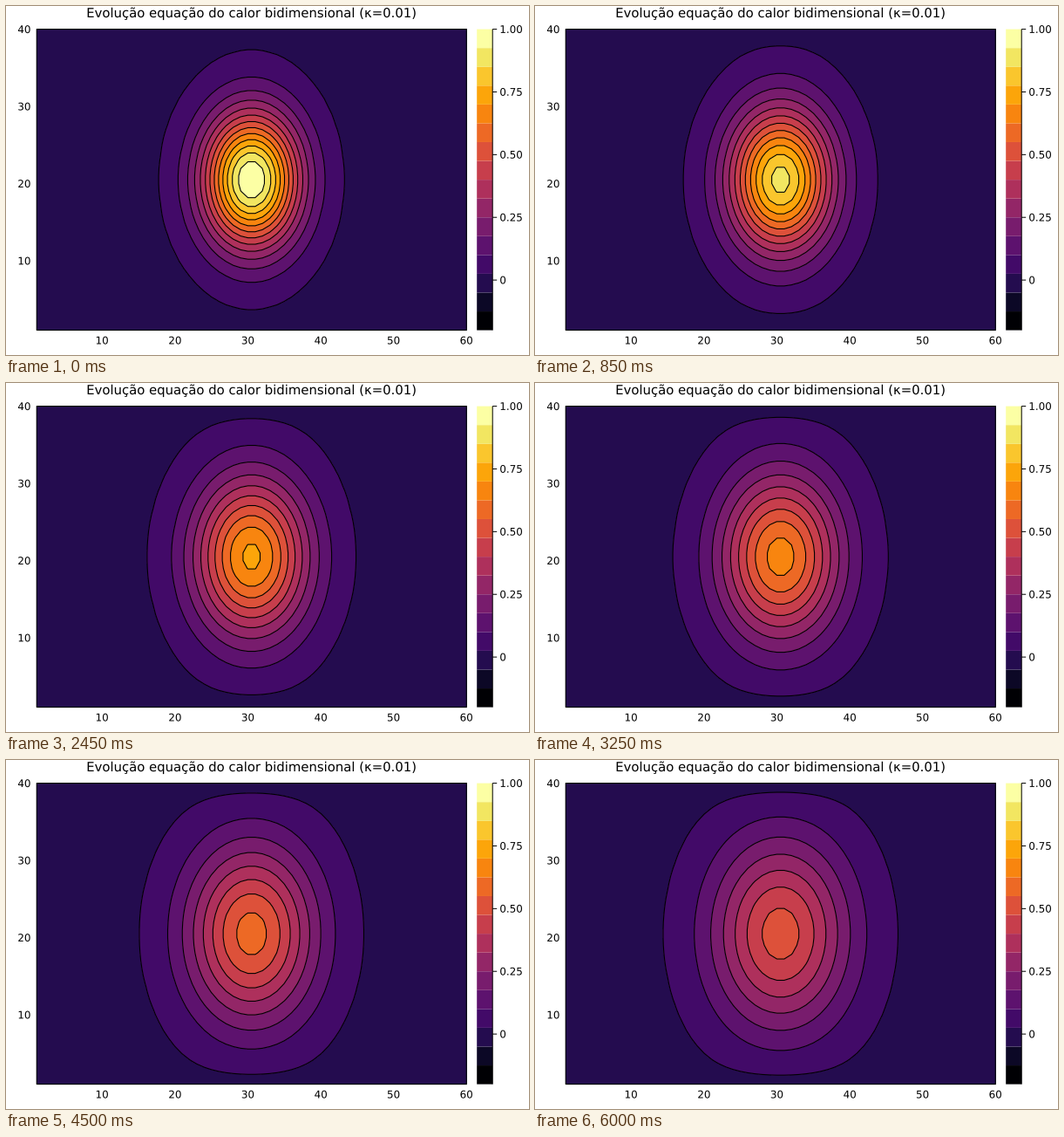
These frames come from a looping animation (600 by 400 pixels, 6050 ms). A matplotlib script:

```python
import numpy as np
import matplotlib.pyplot as plt
from matplotlib.animation import FuncAnimation
from matplotlib.patches import PathPatch, Rectangle
from matplotlib.textpath import TextPath
from matplotlib.transforms import Affine2D

plt.rcParams["font.family"] = "DejaVu Sans"

W, H, DPI = 600, 400, 100
LEFT, RIGHT, TOP, BOTTOM = 35.2, 528.2, 26.6, 371.6
BAR_L, BAR_R = 540.2, 558.2
NX, NY = 60, 40
KAPPA, DT, FRAMES = 0.01, 0.01, 121
SPREAD = 0.0504
LEVELS = np.linspace(-0.2, 1.0, 17)
COLORS = plt.get_cmap("inferno")(np.linspace(0, 1, 16))


def pt(px):
    return px * 72 / DPI


def px_x(i):
    return LEFT + (i - 1) * (RIGHT - LEFT) / (NX - 1)


def px_y(j):
    return BOTTOM - (j - 1) * (BOTTOM - TOP) / (NY - 1)


def bar_y(v):
    return BOTTOM - (v + 0.2) / 1.2 * (BOTTOM - TOP)


def solve():
    """Explicit heat equation on a 2 x 1 plate with cold edges."""
    x, y = np.linspace(-1, 1, NX), np.linspace(-0.5, 0.5, NY)
    u = np.exp(-(x[None, :] ** 2 + y[:, None] ** 2) / SPREAD)
    rx, ry = KAPPA * DT / (x[1] - x[0]) ** 2, KAPPA * DT / (y[1] - y[0]) ** 2
    u[[0, -1], :] = 0
    u[:, [0, -1]] = 0
    states = [u]
    for _ in range(FRAMES - 1):
        c = u[1:-1, 1:-1]
        v = u.copy()
        v[1:-1, 1:-1] += (rx * (u[1:-1, 2:] - 2 * c + u[1:-1, :-2])
                          + ry * (u[2:, 1:-1] - 2 * c + u[:-2, 1:-1]))
        u = v
        states.append(u)
    return states


fig = plt.figure(figsize=(W / DPI, H / DPI), dpi=DPI, facecolor="white")
ax = fig.add_axes([0, 0, 1, 1])
ax.set_xlim(0, W)
ax.set_ylim(H, 0)
ax.axis("off")


def label(x, y, text, size=11.9, align="center"):
    """Text as outlines, so it keeps its sub-pixel position."""
    path = TextPath((0, 0), text, size=size)
    box = path.get_extents()
    shift = {"left": 0, "center": (box.x0 + box.x1) / 2, "right": box.x1}[align]
    path = path.transformed(Affine2D().scale(1, -1).translate(x - shift, y))
    ax.add_patch(PathPatch(path, fc="black", lw=0, snap=False))


def line(xs, ys):
    ax.plot(xs, ys, color="black", lw=pt(1), zorder=5, snap=False,
            solid_capstyle="butt", solid_joinstyle="miter")


label((LEFT + RIGHT) / 2, 13, "Evolução equação do calor bidimensional (κ=0.01)", 14.85)

line([LEFT, RIGHT, RIGHT, LEFT, LEFT], [BOTTOM, BOTTOM, TOP, TOP, BOTTOM])
for i in range(10, NX + 1, 10):
    label(px_x(i), 387.5, str(i))
for j in range(10, NY + 1, 10):
    label(27.7, px_y(j) + 4.4, str(j), align="right")

for lo, hi, color in zip(LEVELS[:-1], LEVELS[1:], COLORS):
    ax.add_patch(Rectangle((BAR_L, bar_y(hi)), BAR_R - BAR_L, bar_y(lo) - bar_y(hi),
                           fc=color, lw=0, snap=False))
line([BAR_R] * 2, [TOP, BOTTOM])
for v, text in ((0, "0"), (0.25, "0.25"), (0.5, "0.50"), (0.75, "0.75"), (1, "1.00")):
    line([BAR_R, BAR_R + 5], [bar_y(v)] * 2)
    label(566.3, bar_y(v) + 4.3, text, align="left")

STATES = solve()
GX, GY = np.meshgrid(px_x(np.arange(1, NX + 1)), px_y(np.arange(1, NY + 1)))
sets = []


def update(k):
    while sets:
        sets.pop().remove()
    u = STATES[k]
    sets.append(ax.contourf(GX, GY, u, levels=LEVELS, colors=COLORS, zorder=1))
    sets.append(ax.contour(GX, GY, u, levels=LEVELS, colors="black",
                           linewidths=pt(1.1), zorder=2))
    return sets


anim = FuncAnimation(fig, update, frames=FRAMES, interval=50,
                     init_func=lambda: update(0), repeat=True, repeat_delay=0)
plt.show()
```
